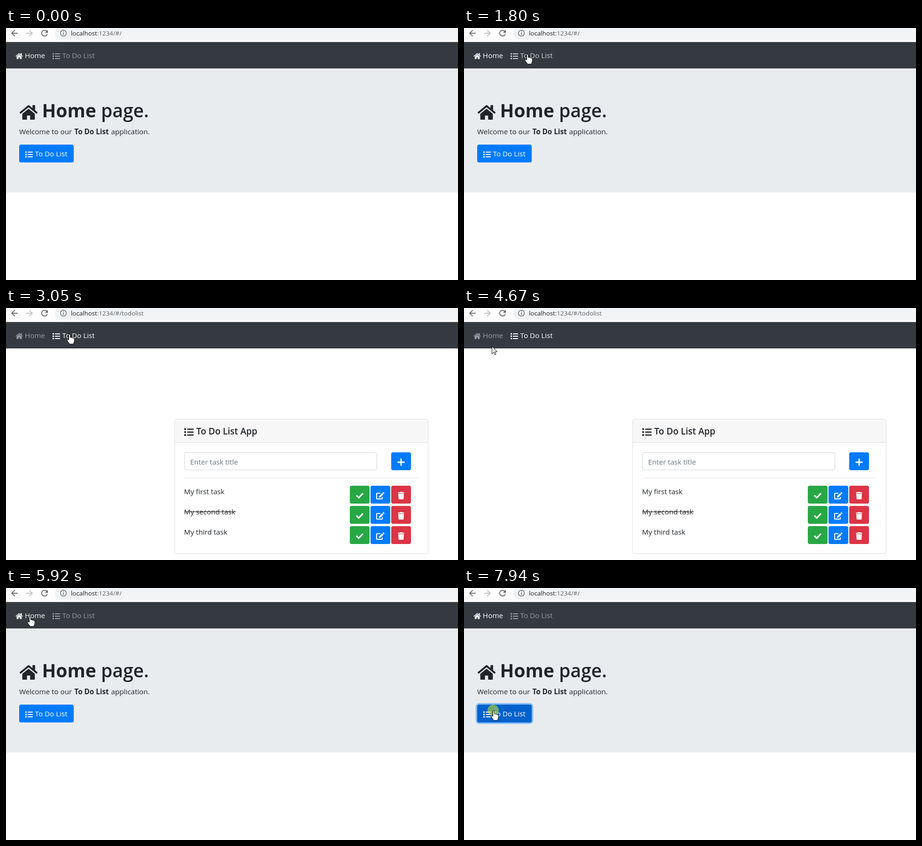
An HTML page for the animation above (8000 ms loop, 961 by 536 pixels).

```html
<!DOCTYPE html>
<html lang="en">
<head>
<meta charset="utf-8">
<title>To do list demo</title>
<style>
  html, body { margin: 0; width: 100%; height: 100%; overflow: hidden; background: #fff; }
  svg.stage { display: block; width: 100vw; height: 100vh; }
  text { font: 15.2px "Open Sans", "Noto Sans", sans-serif; fill: #212529; white-space: pre; }
  .bold { font-weight: 700; }
  .url { font-size: 13.3px; fill: #5f6368; }
  .host { fill: #202124; }
  .h1 { font-size: 39px; }
  .h5 { font-size: 19px; }
  .semi { font-weight: 600; }
  .muted { fill: #6c757d; }
  .ink { fill: #212529; color: #212529; }
  .link text, .button text { fill: currentColor; }
  .link, .button { fill: currentColor; }
  .button { color: #fff; }
  .line { fill: none; stroke: currentColor; }
  .pointer { fill: #fff; stroke: #000; stroke-linejoin: round; }
</style>
</head>
<body>
<svg class="stage" viewBox="0 0 961 536">
  <defs>
    <g id="house">
      <path class="line" stroke-width="58" stroke-linejoin="round" d="M26 276L288 60L550 276"/>
      <path d="M408 44q0-12 12-12h56q12 0 12 12V190L408 124zM288 143L480 300V464q0 16-16 16H336V352H240V480H112q-16 0-16-16V300z"/>
    </g>
    <g id="bullet">
      <rect width="96" height="96" rx="16"/>
      <rect x="160" y="16" width="352" height="64" rx="16"/>
    </g>
    <g id="list">
      <use href="#bullet" y="48"/><use href="#bullet" y="208"/><use href="#bullet" y="368"/>
    </g>
    <path id="back" d="M20 11H7.83l5.59-5.59L12 4l-8 8 8 8 1.41-1.41L7.83 13H20z"/>
    <g id="actions" color="#fff" fill="#fff">
      <rect width="42" height="38" rx="4" fill="#28a745"/>
      <rect x="44" width="42" height="38" rx="4" fill="#007bff"/>
      <rect x="88" width="42" height="38" rx="4" fill="#dc3545"/>
      <path class="line" stroke-width="3.1" d="M14 20.6l4.9 4.9L28 16.2"/>
      <g transform="translate(56 13)">
        <path class="line" stroke-width="2" d="M9 3H1.6Q1 3 1 3.6V14.4Q1 15 1.6 15H12.4Q13 15 13 14.4V11"/>
        <path d="M5.6 12.4L5.9 9.4L12.6 2.7L15.3 5.4L8.6 12.1zM13.4 1.9L14.6.7Q15.2.1 15.9.7L17.3 2.1Q17.9 2.8 17.3 3.4L16.1 4.6z"/>
      </g>
      <path transform="translate(102 13)" d="M.4 1H4l.7-1h4.6l.7 1h3.6v2H.4zM1 4H13L12.3 15Q12.2 16 11.3 16H2.7Q1.8 16 1.7 15z"/>
    </g>
  </defs>

  <rect width="961" height="536" fill="#fff"/>

  <!-- browser bar -->
  <g fill="#5f6368">
    <rect x="104" y="-3" width="900" height="28" rx="14" fill="#f1f3f4"/>
    <rect y="29" width="961" height="1" fill="#dadce0"/>
    <use href="#back" transform="translate(7.5 .5) scale(.875)"/>
    <use href="#back" transform="translate(60.5 .5) scale(-.875 .875)" fill="#babcbe"/>
    <path transform="translate(71.5 .5) scale(.875)" d="M17.65 6.35C16.2 4.9 14.21 4 12 4c-4.42 0-8 3.58-8 8s3.58 8 8 8c3.73 0 6.84-2.55 7.73-6h-2.08c-.82 2.33-3.04 4-5.65 4-3.31 0-6-2.69-6-6s2.69-6 6-6c1.66 0 3.14.69 4.22 1.78L13 11h7V4z"/>
    <circle cx="122" cy="11" r="6.2" fill="none" stroke="#5f6368" stroke-width="1.4"/>
    <path d="M121.2 7.4h1.6V9h-1.6zM121.2 10.3h1.6v4.3h-1.6z"/>
    <text class="url" x="138" y="16"><tspan class="host">localhost</tspan>:1234/#/<tspan id="route"></tspan></text>
  </g>

  <!-- navigation -->
  <rect y="30" width="961" height="56" fill="#343a40"/>
  <g id="homeLink" class="link">
    <use href="#house" transform="translate(20 52.6) scale(.0278)"/>
    <text x="40" y="64">Home</text>
  </g>
  <g id="listLink" class="link">
    <use href="#list" transform="translate(99 52) scale(.03125)"/>
    <text x="119.6" y="64">To Do List</text>
  </g>

  <g id="homePage">
    <rect y="86" width="961" height="264" fill="#e9ecef"/>
    <use class="ink" href="#house" transform="translate(28 161.8) scale(.0694)"/>
    <text class="h1 bold" x="76.5" y="190">Home</text>
    <text class="h1 semi" x="202" y="190">page.</text>
    <text x="28" y="226">Welcome to our</text>
    <text class="bold" x="145.5" y="226">To Do List</text>
    <text x="223.5" y="226">application.</text>
    <g class="button">
      <rect id="ring" x="26.4" y="246.4" width="119.2" height="41.2" rx="5.5" fill="none" stroke="#268fff" stroke-width="3.2"/>
      <rect id="buttonFace" x="28" y="248" width="116" height="38" rx="4"/>
      <use href="#list" transform="translate(41 261) scale(.03125)"/>
      <text x="61.6" y="273">To Do List</text>
    </g>
  </g>

  <g id="listPage">
    <rect x="358.5" y="236.5" width="539" height="286" rx="3.5" fill="#fff" stroke="#dfdfdf"/>
    <path d="M359 286V240q0-3 3-3H894q3 0 3 3V286z" fill="#f7f7f7"/>
    <rect x="359" y="286" width="538" height="1" fill="#dfdfdf"/>
    <use class="ink" href="#list" transform="translate(379 254) scale(.039)"/>
    <text class="h5 semi" x="404.5" y="269">To Do List App</text>
    <rect x="379.5" y="307.5" width="409" height="37" rx="3.5" fill="#fff" stroke="#ced4da"/>
    <text class="muted" x="391.5" y="333">Enter task title</text>
    <rect x="819" y="307" width="42" height="38" rx="4" fill="#007bff"/>
    <path d="M833.5 328h13M840 321.5v13" stroke="#fff" stroke-width="2.8" stroke-linecap="round"/>
    <rect x="379" y="361" width="498" height="1" fill="#e5e5e5"/>
    <text x="378.5" y="396">My first task</text>
    <text x="378.5" y="439">My second task</text>
    <rect x="379" y="433" width="110" height="1" fill="#212529"/>
    <text x="378.5" y="482">My third task</text>
    <use href="#actions" x="731" y="378"/>
    <use href="#actions" x="731" y="421"/>
    <use href="#actions" x="731" y="464"/>
  </g>

  <g id="cursor">
    <circle id="click" r="12" fill="#ff0" fill-opacity=".45"/>
    <path id="arrow" class="pointer" d="M.5.5V16.5L4.2 13L6.6 18.6L9 17.6L6.6 12H11.5z"/>
    <path id="hand" class="pointer" d="M-.5 13V2.5Q-.5.8 1 .8Q2.5.8 2.5 2.5V7.5Q4.5 6.8 5.4 8.2Q7.5 7.5 8.3 9Q11.2 8.7 11.4 11V15Q11.4 17 9.9 19V21.7H1.2Q.3 19.8-1.6 17.6L-4.2 14Q-4.9 12.6-3.5 11.9Q-2.2 11.4-.5 13z"/>
    <path id="beam" d="M-3-7.5H-1L0-7L1-7.5H3M0-7V7M-3 7.5H-1L0 7L1 7.5H3" fill="none" stroke="#000"/>
  </g>
</svg>
<script>
const LOOP = 8000;
const el = id => document.getElementById(id);
const show = (id, on) => el(id).style.display = on ? '' : 'none';
const clamp = v => Math.min(1, Math.max(0, v));
const within = (v, from, to) => v >= from && v < to;
const easeOut = u => 1 - (1 - u) ** 1.6;
const easeInOut = u => u * u * (3 - 2 * u);

// Each move is sampled in a few held steps along a quadratic curve.
const moves = [
  { from: 430, to: 640, steps: 4, ease: easeOut, path: [[985, 615], [747, 493], [509, 372]] },
  { from: 960, to: 1720, steps: 11, ease: easeInOut, path: [[509, 372], [300, 200], [134, 57]] },
  { from: 1800, to: 1800, steps: 1, ease: easeOut, path: [[134, 57], [134, 56], [134, 55]] },
  { from: 3810, to: 4570, steps: 11, ease: easeInOut, path: [[134, 55], [155, 86], [66, 82]] },
  { from: 4670, to: 4670, steps: 1, ease: easeOut, path: [[66, 82], [62, 82], [59, 81]] },
  { from: 4746, to: 5130, steps: 6, ease: easeOut, path: [[59, 81], [53, 75], [50, 62]] },
  { from: 5280, to: 5280, steps: 1, ease: easeOut, path: [[50, 62], [50, 61], [50, 60]] },
  { from: 6230, to: 6990, steps: 11, ease: easeInOut, path: [[50, 60], [33, 130], [66, 218]] },
  { from: 7070, to: 7460, steps: 6, ease: easeOut, path: [[66, 218], [66, 245], [62, 260]] }
];

function pointerAt(time) {
  const move = moves.filter(m => m.from <= time).pop();
  if (!move) return null;
  const gap = (move.to - move.from) / (move.steps - 1) || 1;
  const step = Math.floor((time - move.from) / gap + 1.001);
  const u = move.ease(Math.min(step, move.steps) / move.steps);
  const [a, b, c] = move.path;
  return [0, 1].map(i => Math.round((1 - u) ** 2 * a[i] + 2 * u * (1 - u) * b[i] + u * u * c[i]));
}

const overButton = p => p && within(p[0], 28, 144) && within(p[1], 248, 286);
const mix = (a, b, u) => `rgb(${a.map((v, i) => Math.round(v + (b[i] - v) * u))})`;
const linkColor = (active, hover) => `rgba(255,255,255,${active ? 1 : hover ? .75 : .5})`;

let hoverStart = moves[8].from;
while (!overButton(pointerAt(hoverStart))) hoverStart += 10;

function buttonColor(time) {
  const pressed = clamp((time - 7750) / 150);
  return pressed
    ? mix([0, 105, 217], [0, 98, 204], pressed)
    : mix([0, 123, 255], [0, 105, 217], clamp((time - hoverStart) / 150));
}

function draw(time) {
  const listPage = within(time, 3050, 5920);
  const p = pointerAt(time);
  const [x, y] = p || [-99, -99];
  const onNav = within(y, 38, 78);
  const onHome = onNav && within(x, 12, 91);
  const onList = onNav && within(x, 91, 197);
  const onButton = !listPage && overButton(p);
  const onText = !listPage && (within(y, 208, 232) && within(x, 28, 306) ||
    within(y, 153, 201) && within(x, 80, 302));
  const hand = onHome || onList || onButton;

  el('route').textContent = within(time, 2980, 5830) ? 'todolist' : '';
  show('homePage', !listPage);
  show('listPage', listPage);
  el('homeLink').style.color = linkColor(!listPage, onHome);
  el('listLink').style.color = linkColor(listPage, onList);
  el('buttonFace').style.fill = buttonColor(time);
  el('ring').style.strokeOpacity = .5 * clamp((time - 7750) / 150);

  show('cursor', p);
  el('cursor').setAttribute('transform', `translate(${x} ${y})`);
  show('click', within(time, 2840, 2980) || within(time, 5680, 5830) || time >= 7790);
  show('hand', hand);
  show('beam', onText && !hand);
  show('arrow', !hand && !onText);
}

const start = performance.now();
function tick() {
  draw((performance.now() - start) % LOOP);
  requestAnimationFrame(tick);
}
tick();
</script>
</body>
</html>
```
